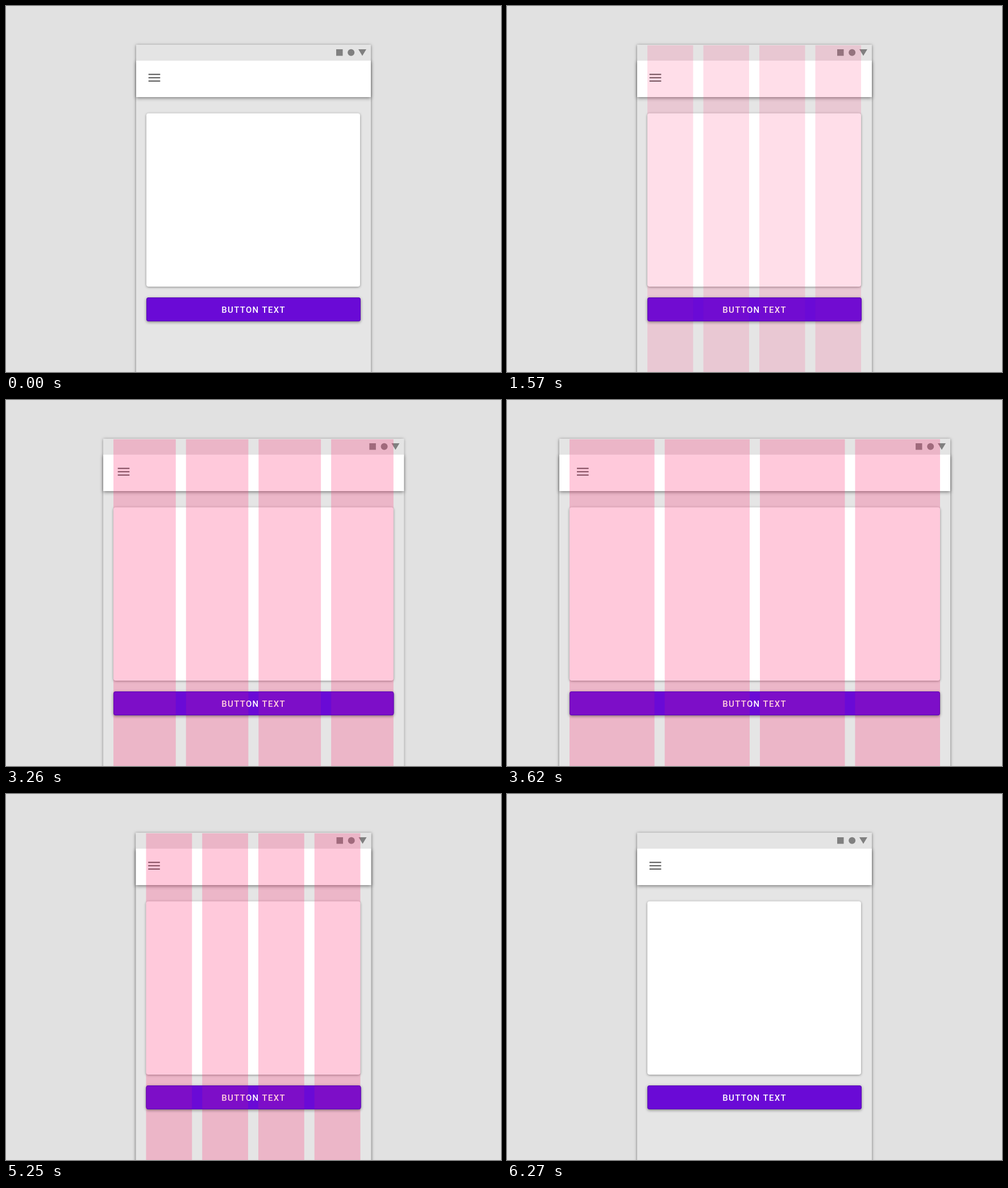
These frames come from a looping animation (871x643 px, 6.3 s). An HTML page with a canvas:

```html
<!DOCTYPE html>
<html lang="en">
<head>
<meta charset="utf-8">
<title>Responsive columns</title>
<style>
  html, body { margin: 0; width: 100%; height: 100%; overflow: hidden; background: #e1e1e1; }
  canvas { display: block; }
</style>
</head>
<body>
<canvas id="stage" width="871" height="643"></canvas>
<script>
const W = 871, H = 643, LOOP = 6300;
const ctx = document.getElementById('stage').getContext('2d');
const PINK = '#ff286f', TINT = 0.25;
const MARGIN = 18, COLUMNS = 4;

const lerp = (a, b, k) => a + (b - a) * k;
const progress = (t, start, length) => Math.min(1, Math.max(0, (t - start) / length));
const smooth = k => k * k * (3 - 2 * k);
const cubic = k => k < 0.5 ? 4 * k ** 3 : 1 - 4 * (1 - k) ** 3;

function rect(x, y, w, h, color) {
  ctx.fillStyle = color;
  ctx.fillRect(x, y, w, h);
}

function surface(x, y, w, h, radius, color, blur, drop, alpha) {
  ctx.save();
  ctx.shadowColor = `rgba(0,0,0,${alpha})`;
  ctx.shadowBlur = blur;
  ctx.shadowOffsetY = drop;
  ctx.fillStyle = color;
  ctx.beginPath();
  ctx.roundRect(x, y, w, h, radius);
  ctx.fill();
  ctx.restore();
}

function columnPath(x, w, y, h) {
  const step = (w + MARGIN) / COLUMNS;
  ctx.beginPath();
  for (let i = 0; i < COLUMNS; i++) ctx.rect(x + i * step, y, step - MARGIN, h);
}

function tintColumns(x, w, y, h, alpha) {
  ctx.save();
  ctx.globalAlpha = alpha;
  ctx.fillStyle = PINK;
  columnPath(x, w, y, h);
  ctx.fill();
  ctx.restore();
}

function statusIcons(right) {
  rect(right - 61, 76, 11.5, 11.5, '#808080');
  ctx.beginPath();
  ctx.arc(right - 34.8, 81.8, 6, 0, Math.PI * 2);
  ctx.fill();
  ctx.beginPath();
  ctx.moveTo(right - 22, 76);
  ctx.lineTo(right - 8, 76);
  ctx.lineTo(right - 15, 87.5);
  ctx.fill();
}

function label(color) {
  ctx.font = '500 15px Roboto, sans-serif';
  ctx.letterSpacing = '1.3px';
  ctx.fillStyle = color;
  ctx.fillText('BUTTON TEXT', 379.3, 539);
}

function draw(t) {
  const wide = cubic(progress(t, 2930, 700)) - cubic(progress(t, 4620, 700));
  const fade = smooth(progress(t, 1203, 640)) - smooth(progress(t, 5280, 630));
  const left = lerp(229, 92, wide), right = lerp(642, 780, wide);
  const x = left + MARGIN, w = right - left - 2 * MARGIN - lerp(1, 0, wide);

  rect(0, 0, W, H, '#e1e1e1');
  surface(left, 68, right - left, H, 0, '#e5e5e5', 5, 1, 0.5);
  surface(left, 96, right - left, 64, 0, '#fff', 6, 2, 0.45);
  rect(left, 68, right - left, 28, '#e4e4e4');
  statusIcons(right);

  const menu = lerp(250.7, 123, wide);
  for (let i = 0; i < 3; i++) rect(menu, 119 + i * 5.85, 20.6, 2.3, '#696969');

  surface(x, 188.5, w, 304.5, 4, '#fff', 4, 1, 0.4);
  tintColumns(x, w, 69, H, TINT * fade);

  const bw = w + lerp(1, 0, wide);
  surface(x, 512, bw, 42, 4, '#6a0ad6', 5, 1.5, 0.45);
  ctx.strokeStyle = '#5806b8';
  ctx.lineWidth = 1;
  ctx.beginPath();
  ctx.roundRect(x + 0.5, 512.5, bw - 1, 41, 3.5);
  ctx.stroke();
  tintColumns(x, w, 513, 40, 0.13 * fade * fade);

  label('#fff');
  if (fade > 0) {
    ctx.save();
    columnPath(x, w, 512, 42);
    ctx.clip();
    ctx.globalAlpha = TINT * fade;
    label(PINK);
    ctx.restore();
  }
}

const begin = performance.now();
function tick() {
  draw((performance.now() - begin) % LOOP);
  requestAnimationFrame(tick);
}
tick();
</script>
</body>
</html>
```
